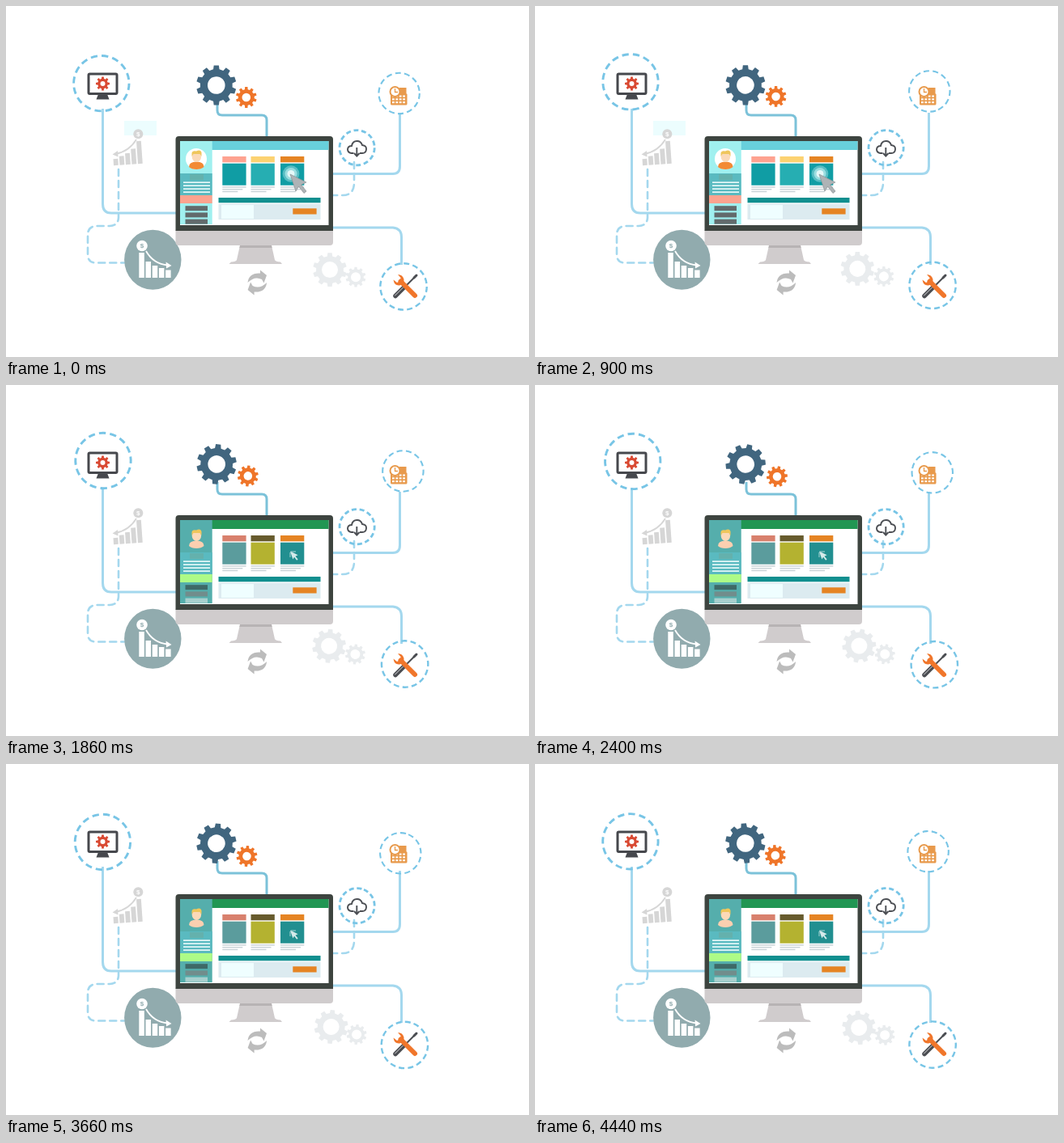
Write an HTML page that moves like this. It is 646 px wide and 434 px high and loops after 4.5 s.

```html
<!DOCTYPE html>
<html lang="en">
<head>
<meta charset="utf-8">
<title>Connected desktop</title>
<style>
html, body { margin: 0; width: 100%; height: 100%; overflow: hidden; background: #fff; }
svg { display: block; width: 646px; height: 434px; }
.wire { fill: none; stroke: #a4d8ee; stroke-width: 3; }
.dash { stroke-dasharray: 8 6; stroke-linecap: round; stroke-width: 2.6; }
.ring { fill: none; stroke: #78c5e6; }
text { font: bold 8px Arial, "Liberation Sans", sans-serif; text-anchor: middle; }
</style>
</head>
<body>
<svg viewBox="0 0 646 434" xmlns="http://www.w3.org/2000/svg">
  <g id="patch"><path fill="#ecfdfe" d="M146 142H186V160H146Z"/></g>

  <path class="wire" d="M119.5 127V245Q119.5 256 130 256H210"/>
  <path class="wire" stroke="#7cc2d9" style="stroke:#7cc2d9" d="M261 120V129Q261 135 267 135H316Q322 135 322 141V161"/>
  <path class="wire" d="M486.5 132V198Q486.5 207.5 478 207.5H404"/>
  <path class="wire" d="M404 274H478Q488.5 275 488.5 286V320"/>
  <path class="wire dash" d="M430 193V220Q429 234 416 234H404"/>
  <path class="wire dash" d="M139 202V262Q138 272 128 272H111Q101 273 101 283V307Q101 317.500 111 317.500H146"/>

  <g id="spinners"></g>

  <!-- desktop icon -->
  <rect x="102" y="84" width="35" height="24.500" rx="1.500" fill="#fff" stroke="#46484d" stroke-width="3"/>
  <path fill="#46484d" d="M114 109H125L127.500 115.500H111.500Z"/>
  <path id="redGear" fill="#d94a33" fill-rule="evenodd" transform="translate(119.500 96)"/>

  <!-- rising chart -->
  <g fill="#d6d6d6">
    <g id="rising" transform="rotate(-4 151 196)"></g>
    <circle cx="163.300" cy="158.300" r="6"/>
    <path d="M161 165Q152 180 135 183" fill="none" stroke="#d6d6d6" stroke-width="1.800"/>
    <path d="M131.500 183.500L138 179L138.500 186.500Z"/>
    <text x="163.300" y="161.200" fill="#fff">$</text>
  </g>

  <!-- falling chart -->
  <ellipse cx="181.300" cy="313.800" rx="35.200" ry="37" fill="#91abae"/>
  <g fill="#fff">
    <g id="falling"></g>
    <circle cx="168" cy="296.500" r="6.800"/>
    <path d="M173 303Q182 319 200 320.500" fill="none" stroke="#fff" stroke-width="1.800"/>
    <path d="M204.500 321L197.500 316.500L198 324.500Z"/>
    <text x="168" y="299.300" fill="#91abae">$</text>
  </g>

  <!-- clock and calendar -->
  <g stroke="#e89a4c" fill="none">
    <path id="cells" stroke="none" fill="#fff"/>
    <circle cx="480.500" cy="106" r="6" fill="#fff" stroke-width="2"/>
    <path d="M480.500 102V106.500H484" stroke-width="1.300"/>
  </g>

  <!-- cloud -->
  <path d="M429.500 182H426.500Q421.800 181 422 177Q422.500 173 427 173Q428 167 433.500 167Q438.500 167 440 172Q445.500 172.500 445 177.500Q444.500 182 440 182H437" fill="#fff" stroke="#4c4f54" stroke-width="1.900"/>
  <path d="M433.300 175V185M430 182L433.300 185.500L436.600 182" fill="none" stroke="#4c4f54" stroke-width="1.900"/>

  <!-- tools -->
  <g fill="none" stroke-linecap="round">
    <path d="M507 333L494 346" stroke="#4b4d52" stroke-width="2"/>
    <path d="M504 336L507 333" stroke="#4b4d52" stroke-width="3"/>
    <path d="M492 347.500L481 358.500" stroke="#4b4d52" stroke-width="5.500"/>
    <path d="M490.500 348L480.500 358" stroke="#fff" stroke-width=".8"/>
    <path d="M487.500 340.500L505 358" stroke="#f0762b" stroke-width="6"/>
  </g>
  <path d="M484 332Q490 332 491.500 338Q492 344 486 345.500Q479.500 346 478.500 338.500L483 342L487.500 340L487.500 336Z" fill="#f0762b"/>

  <!-- refresh -->
  <g id="refresh" fill="#bcbcbc">
    <path id="arrow" d="M298.500 342Q300 329.500 314 330.500L314 326.500L322 333L318.500 342.500L316 338Q307 333.500 298.500 342Z"/>
    <use href="#arrow" transform="rotate(180 310.300 342)"/>
  </g>

  <!-- computer -->
  <path fill="#d0cccd" d="M209.500 277H404V292Q404 296 400 296H213.500Q209.500 296 209.500 292Z"/>
  <path fill="#d0cccd" d="M289 296H328L332 314Q333 316 339 316.500L341 319H275.500L278 316.500Q284 316 285 314Z"/>
  <path fill="#b7b3b4" d="M289 296H328L328.600 299H288.400Z"/>
  <path fill="#3d443f" d="M209.500 278V165Q209.500 161 213.500 161H400Q404 161 404 165V278Z"/>
  <path fill="#fff" d="M215 167H398.500V271H215Z"/>
  <g id="light"></g>
  <g id="dark"></g>
</svg>

<script>
const LOOP = 4500, STEP = 60, SWITCH = 1500;
const $ = id => document.getElementById(id);
const rect = (x, y, w, h, fill) =>
  `<rect x="${x}" y="${y}" width="${w}" height="${h}"${fill ? ` fill="${fill}"` : ''}/>`;

// Toothed wheel with a hole, centred on 0,0
function gear(teeth, outer, root, hole) {
  const at = (r, a) => `${(r * Math.sin(a)).toFixed(2)} ${(-r * Math.cos(a)).toFixed(2)}`;
  const pitch = 2 * Math.PI / teeth, pts = [];
  for (let i = 0; i < teeth; i++) {
    const a = i * pitch;
    pts.push(at(root, a - pitch * .3), at(outer, a - pitch * .2),
             at(outer, a + pitch * .2), at(root, a + pitch * .3));
  }
  return `M${pts.join('L')}ZM${hole} 0A${hole} ${hole} 0 1 0 ${-hole} 0A${hole} ${hole} 0 1 0 ${hole} 0Z`;
}

const wheel = (n, outer, root, hole, fill) =>
  `<path d="${gear(n, outer, root, hole)}" fill="${fill}" fill-rule="evenodd"/>`;

function ring(r, width, dashes) {
  const unit = 2 * Math.PI * r / dashes;
  return `<circle class="ring" r="${r}" stroke-width="${width}" stroke-dasharray="${unit * .62} ${unit * .38}"/>`;
}

// pivot x, y, distance of the centre from it, starting angle, shape
const parts = [
  [119.2, 94.9, 1.6, 150, ring(34.2, 2.9, 16)],
  [488.2, 107.9, 2.6, 178, ring(25.2, 2.1, 14)],
  [433.6, 175.2, 0, 0, ring(21.6, 2.8, 14)],
  [492.1, 346.2, 1.3, 145, ring(28.7, 2.4, 16)],
  [260, 98, .2, 180, wheel(10, 24.8, 20, 10.8, '#41667f')],
  [297.9, 113, 1.1, 180, wheel(10, 13, 10, 5.3, '#ef7529')],
  [400, 324.3, 1.8, 90, wheel(10, 21, 17, 10, '#e9ecee')],
  [432, 334, 1.2, 90, wheel(10, 12.5, 9.8, 6, '#e9ecee')]
];
$('spinners').innerHTML = parts.map(([x, y, d, a, shape]) => {
  const rad = a * Math.PI / 180;
  return `<g><g transform="translate(${x + d * Math.cos(rad)} ${y + d * Math.sin(rad)})">${shape}</g></g>`;
}).join('');
const spinners = [...$('spinners').children];

$('redGear').setAttribute('d', gear(8, 8.6, 6.3, 3));
$('rising').innerHTML = [8, 11, 14, 19, 28].map((h, i) => rect(133 + i * 7.5, 196 - h, 5.8, h)).join('');
$('falling').innerHTML = [31, 20, 15, 12, 9.5].map((h, i) => rect(164.3 + i * 8.2, 336 - h, 6.5, h)).join('');

let cells = '<rect x="475" y="108" width="20.500" height="14.500" rx="1.500" fill="#e89a4c"/>' + rect(486, 101, 8.5, 7, '#e89a4c');
for (let i = 0; i < 12; i++) cells += rect(477 + i % 4 * 4.4, 110.5 + Math.floor(i / 4) * 3.8, 2.8, 2.1, '#fff');
$('cells').outerHTML = `<g stroke="none">${cells}</g>`;

function screen(c) {
  let s = rect(254, 167, 144.5, 11, c.top) + rect(215, 167, 39.7, 103, c.side);
  if (c.halo) s += `<circle cx="235" cy="189" r="13" fill="${c.halo}"/>`;
  s += `<path d="M226 199Q226 192.500 235.300 192.500Q244.500 192.500 244.500 199Q241 202 235.300 202Q229 202 226 199Z" fill="${c.shirt}"/>
    <ellipse cx="235.400" cy="186.500" rx="5.700" ry="6.500" fill="#fbd9b8"/>
    <path d="M229.500 186V182Q230 178.500 235 179.500Q240 177 241.500 181V186L239.500 183H231.500Z" fill="#efc65c"/>`;
  s += rect(215, 207, 39.7, 27, '#5abac0') + rect(227, 208, 17, 7, '#64b1ad');
  for (let i = 0; i < 4; i++) s += rect(219, 217.3 + i * 4, 33, 1.7, '#e4f8f8');
  s += rect(215, 234, 39.7, 10, c.band);
  c.menu.forEach((f, i) => s += rect(221.5, 247.2 + i * 8.2, 27.5, 6, f));
  [267.3, 302.5, 339].forEach((x, i) => {
    s += rect(x, 186, 29.3, 7.3, c.heads[i]) + rect(x, 194.7, 29.3, 27, c.cards[i]);
    [29.3, 25, 19].forEach((w, j) => s += rect(x, 223.2 + j * 2.8, w, 1.4, '#c8d2d6'));
  });
  return s + rect(262.5, 237, 126, 6.3, '#108f8f') + rect(262.5, 244.7, 126, 19.3, '#dcebf0') +
    rect(266, 246, 40, 17, '#effeff') + rect(354.3, 250.3, 29.3, 7.2, '#e58423');
}

const pointer = 'M0 0L20 10L13.500 13L20 21L17 23.500L10.500 15L7 21Z';
$('light').innerHTML = screen({
  top: '#68d0dc', side: '#a0f0ef', halo: '#fff', shirt: '#f28a35', band: '#fca38f',
  menu: ['#626b6c', '#626b6c', '#626b6c'],
  heads: ['#fea290', '#fcd271', '#e58423'], cards: ['#109da4', '#26aeb2', '#109da4']
}) + `<circle cx="352" cy="207.500" r="10.300" fill="#58bdc3"/>
  <circle cx="352" cy="207.500" r="7.500" fill="#9adde0"/><circle cx="352" cy="207.500" r="4.500" fill="#e5f8f8"/>
  <path d="${pointer}" transform="translate(351 208)" fill="#aeb3b6" stroke="#8c9295" stroke-width=".7"/>`;
$('dark').innerHTML = screen({
  top: '#219653', side: '#55aeac', shirt: '#fbcfb0', band: '#adfb87',
  menu: ['#3e6967', '#718d8c', '#a7cfcd'],
  heads: ['#d8806d', '#675b2d', '#e58423'], cards: ['#5b9c9d', '#b4b230', '#228f90']
}) + `<path d="${pointer}" transform="translate(351 205.500) scale(.48)" fill="#d5eaea"/>
  <path d="M351 207V213M352 206H358" stroke="#a9d5d5" stroke-width="1"/>`;

function draw(now) {
  const t = Math.floor(now % LOOP / STEP) * STEP;
  const turn = t / LOOP * 360;
  spinners.forEach((g, i) => g.setAttribute('transform', `rotate(${turn} ${parts[i][0]} ${parts[i][1]})`));
  const early = t < SWITCH;
  $('patch').style.display = $('light').style.display = early ? '' : 'none';
  $('dark').style.display = early ? 'none' : '';
}

let start;
function tick(now) {
  start ??= now;
  draw(now - start);
  requestAnimationFrame(tick);
}
draw(0);
requestAnimationFrame(tick);
</script>
</body>
</html>
```
